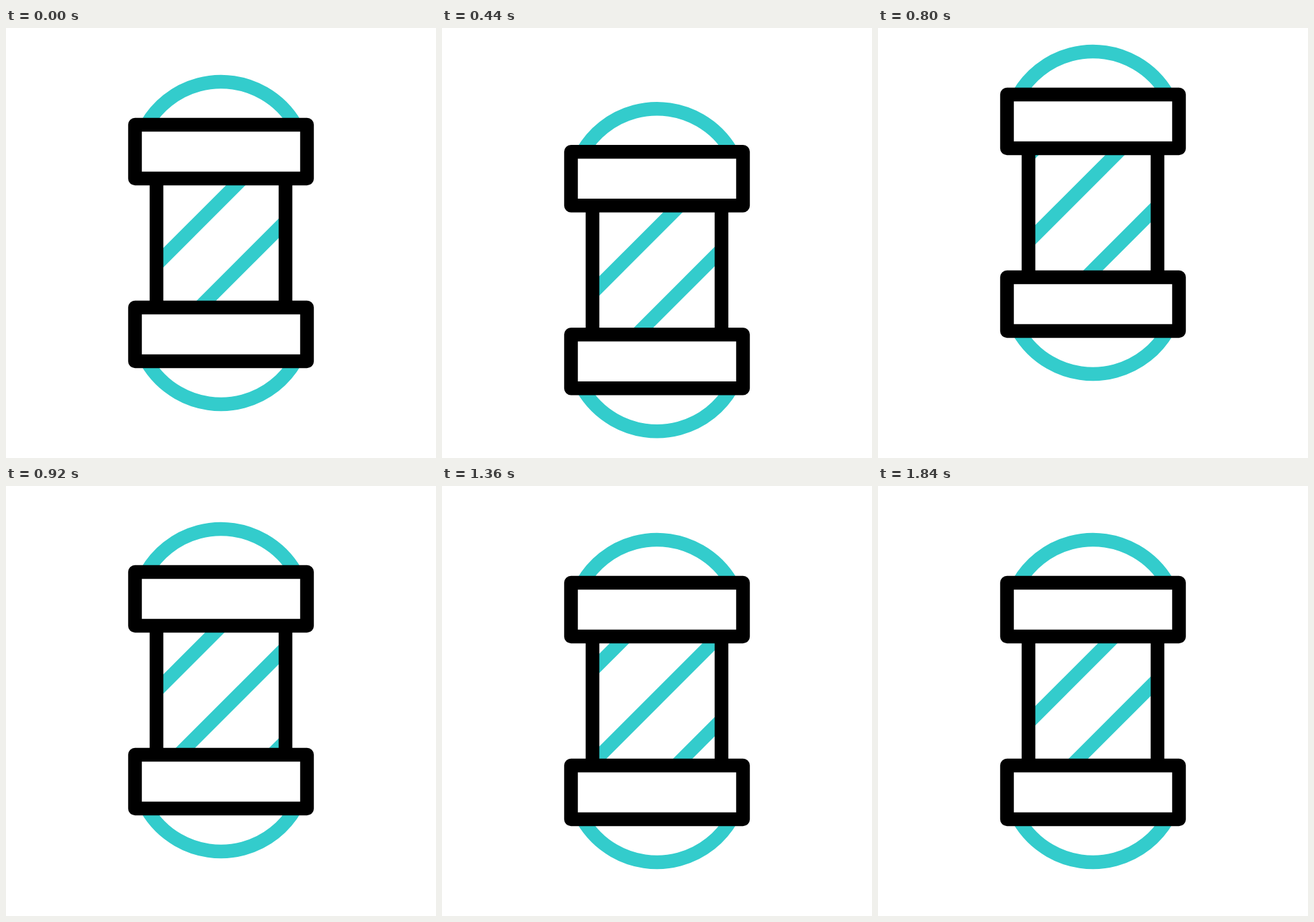
These frames come from a looping animation (640 px wide and 640 px high, 2 s). An HTML page with a canvas:

```html
<!DOCTYPE html>
<html lang="en">
<head>
<meta charset="utf-8">
<title>Barber pole</title>
<style>
  html, body { margin: 0; width: 100%; height: 100%; overflow: hidden; background: #fff; }
  canvas { display: block; width: 100vw; height: 100vh; }
</style>
</head>
<body>
<canvas id="stage" width="640" height="640"></canvas>
<script>
const ctx = document.getElementById('stage').getContext('2d');

const LOOP = 2000, STEP = 40;
const TEAL = '#33cccc', BLACK = '#000', LINE = 20.4;

// Vertical bounce of the whole pole: [time, offset]
const BOUNCE = [[120, 0], [400, 46], [680, -58.7], [1120, 16.5], [1320, 0]];
// Travel of the stripes inside the glass
const SLIDE = [[400, 0], [1840, 794]];
// Each stripe lies on x + y = constant; they come in pairs
const PAIRS = [576, 309, 48, -218], PAIR_GAP = 128;

function tween(keys, t) {
  if (t <= keys[0][0]) return keys[0][1];
  for (let i = 1; i < keys.length; i++) {
    const [t0, v0] = keys[i - 1], [t1, v1] = keys[i];
    if (t < t1) {
      const u = (t - t0) / (t1 - t0);
      return v0 + (v1 - v0) * u * u * (3 - 2 * u);
    }
  }
  return keys[keys.length - 1][1];
}

function line(x0, y0, x1, y1) {
  ctx.beginPath();
  ctx.moveTo(x0, y0);
  ctx.lineTo(x1, y1);
  ctx.stroke();
}

function arc(y, from, to) {
  ctx.beginPath();
  ctx.arc(320, y, 128, from * Math.PI / 180, to * Math.PI / 180);
  ctx.stroke();
}

function drawStripes(shift) {
  ctx.save();
  ctx.beginPath();
  ctx.rect(224, 224, 192, 192);
  ctx.clip();
  for (const base of PAIRS) {
    for (const sum of [base + shift, base + shift + PAIR_GAP]) {
      line(sum - 100, 100, sum - 540, 540);
    }
  }
  ctx.restore();
}

function draw(t) {
  ctx.fillStyle = '#fff';
  ctx.fillRect(0, 0, 640, 640);
  ctx.save();
  ctx.translate(0, tween(BOUNCE, t));
  ctx.lineWidth = LINE;
  ctx.lineJoin = 'round';

  ctx.strokeStyle = TEAL;
  arc(208, 210, 330);
  arc(432, 30, 150);
  drawStripes(tween(SLIDE, t));

  ctx.strokeStyle = BLACK;
  line(224, 224, 224, 416);
  line(416, 224, 416, 416);
  ctx.strokeRect(192, 144, 256, 80);
  ctx.strokeRect(192, 416, 256, 80);
  ctx.restore();
}

const start = performance.now();
function tick() {
  const t = (performance.now() - start) % LOOP;
  draw(Math.floor(t / STEP) * STEP);
  requestAnimationFrame(tick);
}
tick();
</script>
</body>
</html>
```
